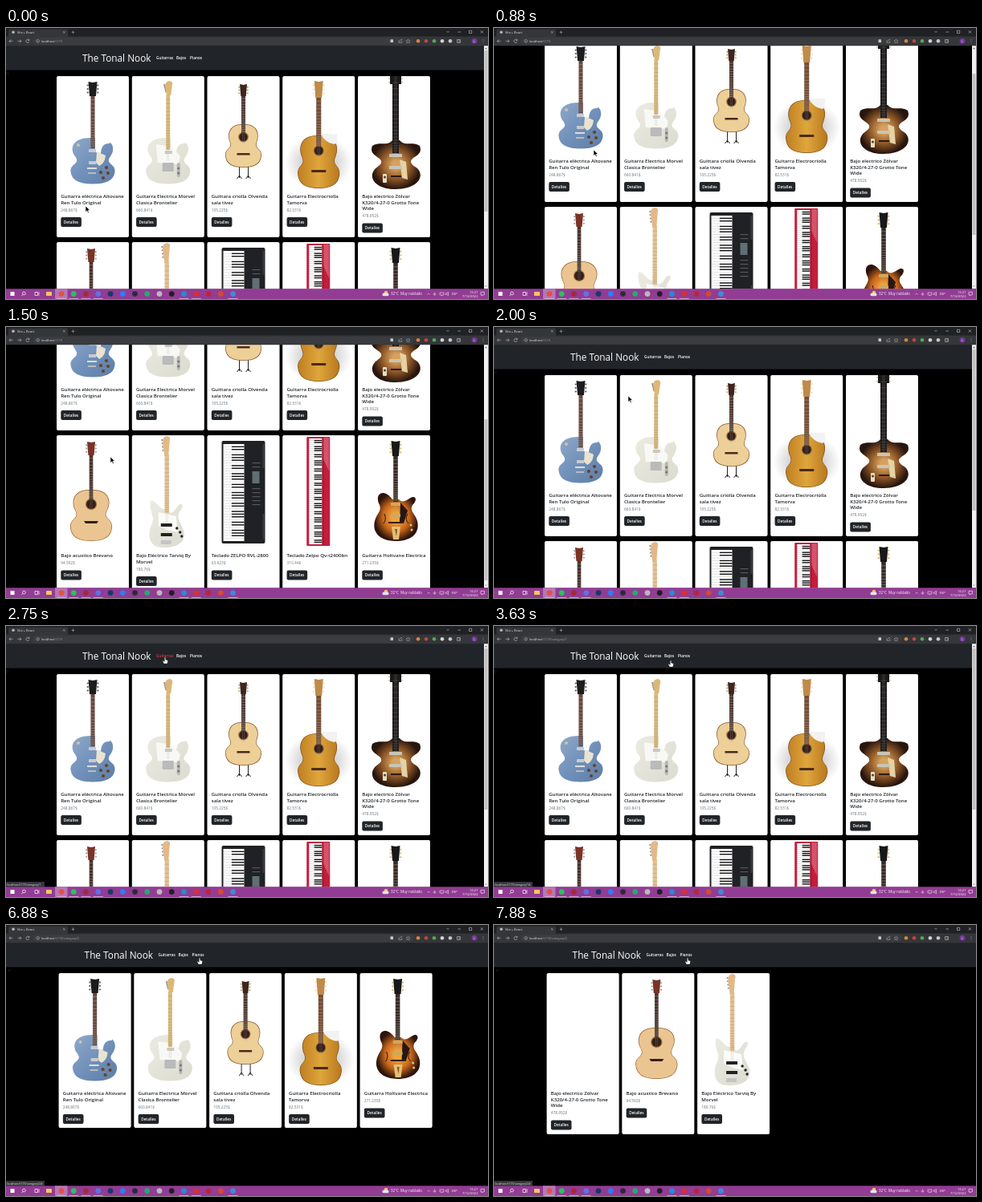
Animation of 600x338 px, one loop 8000 ms. Source, as an HTML page:

```html
<!DOCTYPE html>
<html lang="es">
<head>
<meta charset="utf-8">
<title>Vite + React</title>
<style>
  html, body { margin: 0; width: 100%; height: 100%; overflow: hidden; background: #000; }
  svg { display: block; width: 100%; height: 100%; }
  text { font-family: "Open Sans", "Noto Sans", sans-serif; }
  .brand { font-size: 11.8px; font-weight: 500; fill: #fff; }
  .title { font-size: 6.1px; font-weight: 600; fill: #212529; }
  .price { font-size: 4.8px; fill: #6c757d; }
  .button, .link { font-size: 4.7px; font-weight: 600; fill: #fff; }
  .link.hover { fill: #dc3545; }
  .small { font-size: 3.9px; fill: #e8eaed; }
  .bar { font-size: 4.1px; font-weight: 500; fill: #fff; }
</style>
</head>
<body>
<svg viewBox="0 0 600 338" preserveAspectRatio="none">
  <defs>
    <clipPath id="window"><rect y="22" width="600" height="303.5"/></clipPath>
    <radialGradient id="burst"><stop offset=".2" stop-color="#f0a23c"/><stop offset=".6" stop-color="#c8661c"/><stop offset="1" stop-color="#2c140c"/></radialGradient>
    <radialGradient id="violin"><stop offset=".15" stop-color="#d9a25a"/><stop offset=".6" stop-color="#8a5527"/><stop offset="1" stop-color="#28150d"/></radialGradient>
    <radialGradient id="shade"><stop offset=".5" stop-color="#d6d6d6"/><stop offset="1" stop-color="#fff"/></radialGradient>
    <linearGradient id="blue" x2="1" y2="1"><stop stop-color="#8fa9c9"/><stop offset=".5" stop-color="#7191ba"/><stop offset="1" stop-color="#5d7da6"/></linearGradient>
    <linearGradient id="cream" x2="1" y2="1"><stop stop-color="#ecebe2"/><stop offset="1" stop-color="#dcdbcf"/></linearGradient>
    <linearGradient id="honey" x2="1"><stop stop-color="#c07f22"/><stop offset=".5" stop-color="#dfa63c"/><stop offset="1" stop-color="#b8781f"/></linearGradient>
  </defs>
  <g clip-path="url(#window)">
    <rect y="22" width="600" height="304"/>
    <g id="page">
      <g id="nav"></g>
      <g id="home"></g><g id="guitars"></g><g id="basses"></g>
    </g>
    <g id="scrollbar"></g>
    <g id="status"><rect y="319" width="48" height="7" rx="1" fill="#35363a"/><text class="small" x="1" y="323.8" style="font-size:3.5px"></text></g>
  </g>
  <g id="browser"></g>
  <g id="taskbar"></g>
  <g id="cursor">
    <path id="arrow" d="M0 0V7.4L1.8 5.8 3 8.5 4.2 8 3 5.3H5.4Z" stroke="#fff" stroke-width=".5"/>
    <path id="hand" d="M-.7 .6Q0 -.4 .7 .6V3L3.3 3.7V6L2.6 8H-1.4L-3 5 -2.4 4.3 -.7 5.4Z" fill="#fff" stroke="#222" stroke-width=".4"/>
  </g>
</svg>
<script>
const $ = id => document.getElementById(id);
const rect = (x, y, w, h, fill, r = 0) => `<rect x="${x}" y="${y}" width="${w}" height="${h}" rx="${r}" fill="${fill}"/>`;
const dot = (x, y, r, fill) => `<circle cx="${x}" cy="${y}" r="${r}" fill="${fill}"/>`;
const path = (d, fill) => `<path d="${d}" fill="${fill}"/>`;
const line = (d, color, width = .7) => `<path d="${d}" fill="none" stroke="${color}" stroke-width="${width}"/>`;
const text = (x, y, cls, str, extra = '') => `<text x="${x}" y="${y}" class="${cls}" ${extra}>${str}</text>`;

// Instrument parts, in card coordinates
function neck(cx, w, y0, y1, fill, fret = '#c9bfae') {
  let frets = '';
  for (let n = 1; n < 19; n++) {
    const y = y0 + (y1 - y0) * 1.5 * (1 - 2 ** (-n / 12));
    if (y < y1) frets += `M${cx - w / 2} ${y}h${w}`;
  }
  return rect(cx - w / 2, y0, w, y1 - y0, fill) + line(frets, fret, .4) +
    line(`M${cx - 1} ${y0}V${y1 + 14}M${cx + 1} ${y0}V${y1 + 14}`, '#aaa39a', .25);
}
function head(cx, y, w, h, fill, peg) {
  let pegs = '';
  for (let i = 0; i < 3; i++)
    for (const side of [-1, 1]) pegs += dot(cx + side * (w / 2 + .8), y + h * (.25 + i * .25), 1.1, peg);
  return pegs + path(`M${cx - w / 2} ${y}L${cx} ${y + 1}L${cx + w / 2} ${y}L${cx + w * .36} ${y + h}H${cx - w * .36}Z`, fill);
}
function sideHead(cx, y, h, fill, pegs) {
  let knobs = '';
  for (let i = 0; i < pegs; i++) knobs += dot(cx - 5.5 + i * .4, y + 5 + i * (h - 8) / pegs, 1.1, '#8d8a84');
  return knobs + path(`M${cx - 2.5} ${y + h}L${cx - 5} ${y + 6}Q${cx - 4} ${y} ${cx + 1} ${y}Q${cx + 6} ${y + 1} ${cx + 4} ${y + 6}L${cx + 2.5} ${y + h}Z`, fill);
}
function body(cx, y0, y1, upper, waist, lower, fill) {
  const h = y1 - y0;
  const half = s => `M${cx} ${y0}C${cx + s * upper} ${y0 - h * .02} ${cx + s * upper * 1.18} ${y0 + h * .22} ${cx + s * waist} ${y0 + h * .4}` +
    `S${cx + s * lower * 1.05} ${y0 + h * .55} ${cx + s * lower} ${y0 + h * .74}S${cx + s * lower * .6} ${y1} ${cx} ${y1}Z`;
  return path(half(1) + half(-1), fill);
}
const acoustic = (cx, y0, y1, upper, waist, lower, edge, fill) =>
  body(cx, y0, y1, upper, waist, lower, edge) + body(cx, y0 + .7, y1 - .7, upper - .7, waist - .7, lower - .7, fill);
const singleCut = fill => body(45, 77, 134.5, 25, 22, 27.5, fill) + path('M48 75H70L66 84Q56 83 55 96L48 95Z', '#fff');
const hole = (cx, y, r) => dot(cx, y, r + 1.2, '#a8763f') + dot(cx, y, r, '#33211a');
const pickup = (x, y, w, fill) => rect(x, y, w, 4, fill, .6);

function keys(x, y, w, h, count) {
  let gaps = '', sharps = '';
  for (let i = 1; i < count; i++) {
    const ky = y + h * i / count;
    gaps += `M${x} ${ky}h${w}`;
    if (![0, 3].includes(i % 7)) sharps += rect(x + w * .4, ky - .7, w * .6, 1.4, '#111');
  }
  return rect(x, y, w, h, '#fff') + line(gaps, '#999', .3) + sharps;
}

const art = [
  () => singleCut('url(#blue)') + path('M50 94L61 99Q60 109 53 112L49 108Z', '#e9e3d0') +
    neck(45, 5, 24, 90, '#5d3b33') + head(45, 7, 11, 18, '#1d1d20', '#555') + dot(27, 86, 2, '#c9c4b0') +
    pickup(40, 91, 9, '#c9cbd0') + pickup(40, 106, 9, '#c9cbd0') + rect(38, 114, 12, 2, '#ddd') + rect(39, 120, 10, 2, '#bbb') +
    [[62, 114], [55, 120], [64, 121], [58, 127]].map(p => dot(...p, 2.1, '#6a4128')).join(''),
  () => singleCut('url(#cream)') + path('M30 85L50 88 60 100 58 110 32 108Z', '#f8f8f5') +
    neck(45, 5, 23, 92, '#dfbd80', '#a88850') + sideHead(46, 6, 18, '#dcb878', 6) +
    pickup(41, 93, 9, '#c8c8c4') + rect(38, 108, 14, 11, '#b9bbba', 1) + rect(56, 108, 4, 18, '#b4b6b6', 2) +
    dot(58, 115, 1.6, '#777') + dot(58, 121, 1.6, '#777'),
  () => line('M40 112V127M37 128L40 124 43 128M51 112V127M48 128L51 124 54 128', '#222', 1) +
    acoustic(45, 60, 114, 17.5, 17, 22.5, '#8a5a34', '#edcf98') + hole(45, 76, 5.2) +
    neck(45, 5, 24, 71, '#3c2822') + head(45, 10, 9, 15, '#3f251c', '#bba56f') + rect(37, 96, 16, 2.5, '#4a2a1c'),
  () => '<ellipse cx="45" cy="108" rx="42" ry="34" fill="url(#shade)"/>' +
    acoustic(45, 74, 140, 22, 21, 26, '#7b4d17', 'url(#honey)') + path('M49 72H68V82Q67 86 61 84 54 82 49 75Z', '#f2f2f2') +
    hole(45, 93, 5.5) + neck(45, 6, 26, 88, '#6b432c') + head(45, 6, 11, 21, '#c08a48', '#e8dcb8') + rect(36, 117, 18, 3, '#4a2a18'),
  () => path('M43 80C37 88 26 81 18 87C14 97 23 99 28 104C31 108 28 111 22 115C12 125 20 141 47 141C74 141 84 125 74 115C68 111 64 108 67 104C72 99 81 97 77 87C69 81 58 88 52 80Z', 'url(#violin)') +
    path('M52 104L60 107 62 129 55 127Z', '#e5d2a5') + rect(40, 0, 14, 10, '#19171a') +
    [3, 8].map(y => dot(39, y, 1.2, '#d8d2c4') + dot(55, y, 1.2, '#d8d2c4')).join('') +
    neck(47, 8, 0, 96, '#1a1819', '#625d58') + pickup(39, 97, 16, '#c9c4b6') + pickup(39, 112, 16, '#c9c4b6') +
    rect(41, 124, 13, 2, '#2b1a11') + rect(31, 122, 5, 11, '#eadfc4', 1) + dot(33.5, 126, 1.5, '#443'),
  () => acoustic(43, 68, 132, 22, 20, 26, '#9a6234', '#ebc591') + hole(43, 86, 6) +
    neck(43, 4.6, 24, 80, '#35231d') + head(43, 8, 10, 17, '#7a3326', '#999') + path('M34 107H52L50 110H36Z', '#33201a'),
  () => path('M40 92C33 92 28 78 23 82C21 96 29 100 25 110C19 121 20 139 36 140C50 141 67 137 65 121C63 111 56 107 58 99C60 92 65 90 62 86C56 84 54 99 47 96Z', 'url(#cream)') +
    path('M33 96L55 101 57 121 44 118 33 113Z', '#fbfbf8') + neck(43.5, 5.5, 24, 97, '#e8c69a', '#a9835e') +
    sideHead(43, 1, 25, '#e2b987', 4) + pickup(36, 110, 14, '#222') + pickup(36, 122, 14, '#222') + rect(36, 131, 13, 5, '#c3c5c6') +
    dot(56, 116, 1.7, '#222') + dot(60, 121, 1.7, '#222') + dot(62, 126, 1.7, '#222'),
  () => rect(18, 7, 54, 128, '#202124', 2) + keys(20, 11, 26, 121, 36) + rect(56, 45, 9, 15, '#5f6f75', .5) +
    rect(69, 11, 2, 30, '#3b3c40') + rect(69, 98, 2, 32, '#3b3c40') +
    [34, 39, 66, 71, 76, 81, 86].map(y => rect(56, y, 10, 1.2, '#55575c')).join(''),
  () => rect(30, 2, 29, 136, '#c31d3c', 1) + path('M50 3H58V45L50 28Z', '#d4526a') + keys(33, 4, 16, 132, 52) +
    rect(50, 3, 1, 134, '#8d1028'),
  () => path('M43 80C33 66 21 72 26 85C31 94 24 96 21 107C17 124 31 132 47 132C64 132 78 124 74 107C71 97 64 95 68 87C75 81 72 73 64 79C58 83 55 84 51 80Z', 'url(#burst)') +
    path('M53 84L62 94 57 110 52 108Z', '#251712') + neck(47, 5.5, 26, 83, '#241b18', '#dac69a') +
    head(47, 7, 11, 19, '#18171a', '#d0ad5e') + pickup(41, 84, 12, '#d0a85a') + pickup(41, 98, 12, '#d0a85a') +
    rect(38, 108, 18, 2, '#33201a') + path('M42 114H53L51 130H44Z', '#e1c077') + path('M46 117H49L48 126Z', '#8b541f') +
    line('M33 98Q36 105 32 110M62 98Q58 105 63 110', '#2a140c', 1) + dot(66, 112, 1.5, '#e3c075') + dot(67, 118, 1.5, '#e3c075'),
];

const products = [
  ['248.867$', 'Guitarra eléctrica Altovane', 'Ren Tulo Original'],
  ['660.841$', 'Guitarra Electrica Morvel', 'Clasica Brontelier'],
  ['105.225$', 'Guittara criolla Olvenda', 'sala tivez'],
  ['82.531$', 'Guitarra Electrocriolla', 'Tamorva'],
  ['478.952$', 'Bajo electrico Zölvar', 'K320/4-27-0 Grotto Tone', 'Wide'],
  ['94.592$', 'Bajo acustico Brevano'],
  ['180.76$', 'Bajo Eléctrico Tarviq By', 'Morvel'],
  ['63.623$', 'Teclado ZELPO RVL-2800'],
  ['310.44$', 'Teclado Zelpo Qv-t2400bn'],
  ['271.235$', 'Guitarra Holtvane Electrica'],
];

function card(id, column, top, height, left, blank) {
  const [price, ...lines] = products[id];
  const drop = 7.5 * (lines.length - 1);
  return `<g transform="translate(${left + column * 93.75} ${top})">` +
    rect(0, 0, 90, height, '#d2d2d2', 2) + rect(.3, .3, 89.4, height - .6, '#fff', 1.8) +
    (blank ? '' : art[id]()) +
    lines.map((l, i) => text(5.2, 152.3 + i * 7.5, 'title', l)).join('') +
    text(5.2, 161.3 + drop, 'price', price) + rect(5.3, 168.6 + drop, 25.6, 11.8, '#212529', 2) +
    text(18, 176.2 + drop, 'button', 'Detalles', 'text-anchor="middle"') + '</g>';
}
const row = (ids, top, height, left, blank) => ids.map((id, i) => card(id, i, top, height, left, id === blank)).join('');

$('home').innerHTML = row([0, 1, 2, 3, 4], 60, 201, 63) + row([5, 6, 7, 8, 9], 267, 193, 63);
$('guitars').innerHTML = row([0, 1, 2, 3, 9], 60, 193, 65.6);
$('basses').innerHTML = row([4, 5, 6], 60, 201, 65.6, 4);

$('nav').innerHTML = rect(-5, 22, 610, 30.5, '#212529') + text(95, 42, 'brand', 'The Tonal Nook') +
  [['Guitarras', 187], ['Bajos', 212], ['Pianos', 229]].map(([s, x]) => text(x, 39.3, 'link', s)).join('') +
  text(0, 58, '', '{}', 'fill="#333" font-size="4"');

$('scrollbar').innerHTML = rect(595, 22, 5, 304, '#f1f1f1') + path('M596.2 26.2L597.5 24.5 598.8 26.2Z', '#555') +
  path('M596.2 321.6L597.5 323.3 598.8 321.6Z', '#aaa') + '<rect id="thumb" x="595.6" y="28" width="3.8" height="201" fill="#c1c1c1"/>';

const grey = '#c4c7cb';
$('browser').innerHTML = rect(0, 0, 600, 11, '#202124') + rect(3, 1.5, 74, 10, '#35363a', 2) + rect(0, 10.5, 600, 11.7, '#35363a') +
  dot(9, 5.3, 1.8, '#b8b8c4') + text(14, 6.8, 'small', 'Vite + React') +
  line('M71 4l2.6 2.6m0-2.6l-2.6 2.6M81.5 5.3h4m-2-2v4', grey, .5) +
  line('M548.5 4l1.5 1.5 1.5-1.5M562.5 5h3.5M576.5 3.3h3.2v3.2h-3.2ZM590.8 3.3l3.2 3.2m0-3.2l-3.2 3.2', '#e8eaed', .5) +
  line('M8.5 16.3h-4.5m2-2l-2 2 2 2M14.5 16.3h4.5m-2-2l2 2-2 2', grey, .6) +
  line('M28.8 15.2A2.1 2.1 0 1 0 29 17M29 13.8V15.5H27.2', grey, .6) +
  rect(33.5, 11.9, 474, 9, '#3b3c40', 4.5) + line('M37.9 16.3a1.8 1.8 0 1 0 3.6 0a1.8 1.8 0 1 0-3.6 0M39.7 16v1.2', grey, .5) +
  '<text class="small" x="44" y="17.8">localhost<tspan id="url" fill="#9aa0a6"></tspan></text>' +
  rect(478.5, 14.3, 3.5, 3.8, grey, .5) + line('M489 15.4v2.8h3.8v-2M490.2 16.4q.5-2 3-2', grey, .5) +
  line('M500.5 14l.8 1.6 1.7.2-1.3 1.2.4 1.7-1.6-.9-1.6.9.4-1.7-1.3-1.2 1.7-.2Z', grey, .4) +
  [[513, '#d8853c'], [523, '#c3453e'], [533, '#54a957'], [543, '#cfd6d4'], [553, grey]].map(([x, c]) => dot(x, 16.3, 2.3, c)).join('') +
  line('M561.5 14.5h4v3.8h-4ZM564 14.5v3.8', grey, .6) + dot(583, 16.3, 3.2, '#7a3aa5') +
  text(583, 17.6, 'small', 'L', 'text-anchor="middle"') + [14.5, 16.3, 18.1].map(y => dot(594, y, .45, grey)).join('');

const apps = ['#e64f43', '#27c35a', '#a52a35', '#5e72e4', '#173a66', '#2e7cf2', '#292b38', '#20ad68', '#b9b9bd', '#202024', '#268bd2', '#d93030', '#b72540', '#d14b37', '#3c8bd9'];
$('taskbar').innerHTML = rect(0, 325.3, 600, 13, '#923c94') + rect(61, 325.3, 15.5, 13, '#b577b5') +
  rect(5.5, 329, 5, 5, '#fff') + line('M20.5 331a1.9 1.9 0 1 0 3.8 0a1.9 1.9 0 1 0-3.8 0M21 332.4l-1.7 1.8M36 329.5h3.5v4H36ZM41 329.3v4.4', '#fff', .7) +
  rect(50, 329, 7, 5, '#f3c75b', .6) +
  apps.map((c, i) => dot(69 + i * 15.25, 331.6, 3.4, c)).join('') +
  [0, 1, 2, 3, 10, 11, 14].map(i => rect(63 + i * 15.25, 337.2, 12, .8, '#e4b6e6')).join('') +
  dot(473, 330, 2.3, '#f2c34b') + rect(468.5, 330.5, 8, 3.8, '#dfe6ee', 1.9) +
  text(479, 333.3, 'bar', '32°C&#160; Muy nublado', 'style="font-size:4.4px"') +
  line('M524.5 332.5l1.6-1.6 1.6 1.6M533.5 329.5v3m-1.3-1.5v1.5q1.3 1.6 2.6 0V331M540 330h5v3h-5ZM542.5 333v1.2M547.5 330.8h1.3l1.7-1.4v4.4l-1.7-1.4h-1.3Z', '#fff', .5) +
  text(554.8, 333.2, 'bar', 'ESP') + text(587.5, 330.6, 'bar', '16:21', 'text-anchor="end"') +
  text(587.5, 336.3, 'bar', '7/12/2022', 'text-anchor="end"') +
  line('M591 329.3h4.4v3.6h-2l-1 1v-1H591Z', '#fff', .6);

// Timelines: [ms, values...]
const pointer = [[0, 99, 222], [375, 124, 152], [1000, 124, 152], [1500, 130, 162], [1625, 136, 148], [2000, 167, 86],
  [2250, 186, 60], [2500, 197, 39], [3250, 200, 39], [3625, 220, 43], [3875, 219, 39], [5875, 218.5, 39], [6250, 241, 41], [8000, 241, 41]];
const scroll = [[0, 0], [500, 0], [625, 8], [750, 26], [875, 44], [1000, 78], [1125, 110], [1250, 130], [1375, 138],
  [1500, 132], [1625, 102], [1750, 56], [1875, 16], [2000, 0], [8000, 0]];
const states = [ // hovered link, status path, address path, view
  [0, -1, '', '', 'home'],
  [2500, 0, '/category/1', '', 'home'],
  [3000, 0, '/category/1', '/category/1', 'home'],
  [3375, -1, '/category/1#', '/category/1', 'home'],
  [3875, 1, '/category/2', '/category/1', 'home'],
  [4875, 1, '/category/2', '/category/1', 'guitars'],
  [5875, 1, '/category/2', '/category/2', 'guitars'],
  [6000, -1, '/category/2#', '/category/2', 'guitars'],
  [7875, -1, '/category/2#', '/category/2', 'basses'],
];
function sample(keyframes, t) {
  const i = keyframes.findIndex(k => k[0] > t);
  const [a, b] = [keyframes[i - 1], keyframes[i]];
  const f = (t - a[0]) / (b[0] - a[0]);
  return a.slice(1).map((v, n) => v + (b[n + 1] - v) * f);
}
const show = (id, on) => $(id).setAttribute('display', on ? 'inline' : 'none');
const move = (id, x, y) => $(id).setAttribute('transform', `translate(${x} ${y})`);
const links = document.querySelectorAll('.link');
const statusText = document.querySelector('#status text');

function draw(now) {
  const t = Math.floor(now % 8000 / 125) * 125;
  const [x, y] = sample(pointer, t), [offset] = sample(scroll, t);
  const [, hover, status, address, view] = states.findLast(s => s[0] <= t);
  const home = view === 'home';
  move('cursor', x, y);
  show('hand', t >= 2500);
  show('arrow', t < 2500);
  move('page', 0, -offset);
  move('thumb', 0, offset * .66);
  move('nav', home ? 0 : 2.6, 0);
  for (const id of ['home', 'guitars', 'basses']) show(id, id === view);
  show('scrollbar', home);
  links.forEach((l, i) => l.classList.toggle('hover', i === hover));
  show('status', status);
  statusText.textContent = 'localhost:5173' + status;
  $('url').textContent = ':5173' + address;
  requestAnimationFrame(() => draw(performance.now()));
}
draw(performance.now());
</script>
</body>
</html>
```
